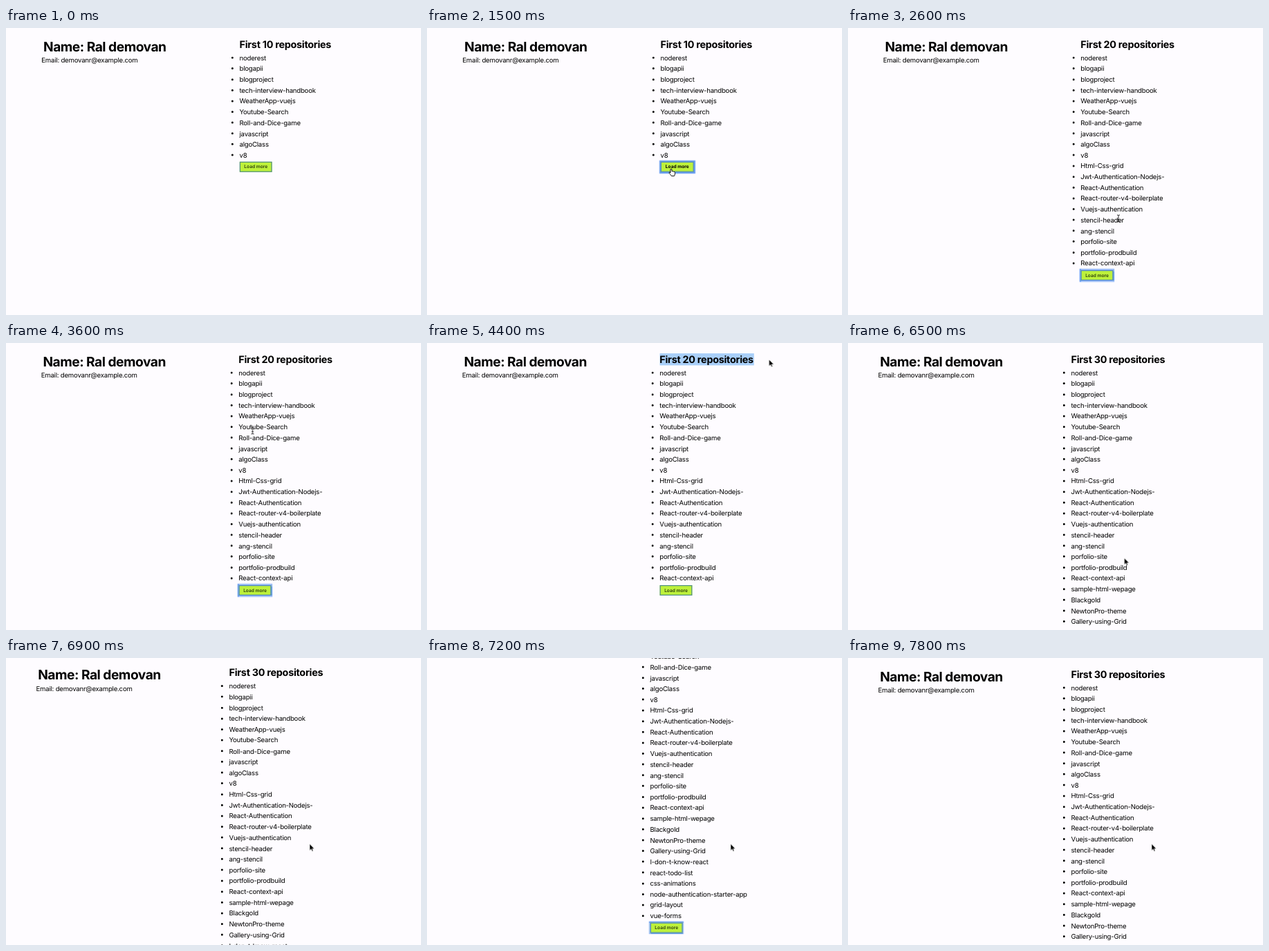
An HTML page for the animation above (8 s loop, 600 px wide and 416 px high).

```html
<!DOCTYPE html>
<html lang="en">
<head>
<meta charset="utf-8">
<title>Repositories</title>
<style>
html, body { margin: 0; width: 100%; height: 100%; overflow: hidden; background: #fefcff; }
body { position: relative; }
#page, #sheet, #user, #repos, h1, h2, #email, #lists, #mark, button, #cursor, #cursor svg { position: absolute; margin: 0; white-space: nowrap; }
#page, #sheet, #user, #repos { left: 0; top: 0; }

/* The web page is laid out 1000 px wide and shown at 60 % */
#sheet {
  width: 1000px; transform: scale(.6); transform-origin: 0 0;
  color: #000; font: 16px/26.13px Inter, "Open Sans", sans-serif;
  letter-spacing: -.023em; text-rendering: geometricPrecision;
}

/* Every track shares one 8 s clock and holds its value between steps */
#page, #user, #repos, h2, ul, #mark, button, button span, #cursor, #cursor svg {
  animation: 8s step-end infinite;
}
#page { animation-name: scroll; }
#user { animation-name: user; }
#repos { animation-name: repos; }

h1 { left: 90px; top: 25px; font-size: 32px; line-height: 40px; font-weight: 700; letter-spacing: -.026em; }
#email { left: 85.5px; top: 64.6px; }
h2 { left: 562.5px; top: 23px; font-size: 24px; line-height: 34px; font-weight: 700; letter-spacing: -.02em; }
#lists { left: 562.5px; top: 58.8px; }
ul { margin: 0; padding: 0; list-style: none; }
li { position: relative; height: 26.13px; }
li::before { content: ""; position: absolute; left: -20px; top: 10.5px; width: 5px; height: 5px; border-radius: 50%; background: #000; }
#mark { left: 563px; top: 25px; width: 0; height: 29px; background: #a9cff9; animation-name: mark; }

.first { animation-name: first; }
.second { animation-name: second; }
.third { animation-name: third; }
h2.second { animation-name: only-second; }

button {
  left: 563px; top: 323px; width: 78px; height: 25px; padding: 0; box-sizing: border-box;
  border: 2px solid #4f8d86; border-radius: 0; background: #bdf13b;
  font: 600 11px/21px Inter, "Open Sans", sans-serif; letter-spacing: 0; text-align: center;
  text-rendering: inherit;
  animation-name: drop, ring, grow;
}
button span { color: #283a0c; animation-name: hover; }

#cursor { left: 0; top: 0; animation-name: move; }
#cursor svg { left: 0; top: 0; width: 1px; height: 1px; overflow: visible; visibility: hidden; }
#cursor #hand { animation-name: hand; }
#cursor #beam { animation-name: beam; }
#cursor #arrow { animation-name: arrow; }

@keyframes first { 0% { visibility: visible } 22.5%, 100% { visibility: hidden } }
@keyframes only-second { 0% { visibility: hidden } 22.5% { visibility: visible } 80%, 100% { visibility: hidden } }
@keyframes second { 0% { visibility: hidden } 22.5%, 100% { visibility: visible } }
@keyframes third { 0% { visibility: hidden } 80%, 100% { visibility: visible } }

@keyframes user { 0% { left: 0 } 22.5% { left: -1px } 80%, 100% { left: -13px } }
@keyframes repos { 0% { left: 0 } 22.5% { left: -2px } 80%, 100% { left: -25px } }
@keyframes drop { 0% { top: 323px } 22.5% { top: 585px } 80%, 100% { top: 846px } }
@keyframes scroll {
  0%, 85% { transform: none }
  86.25% { transform: translateY(-2.4px) }
  87.5% { transform: translateY(-34px) }
  88.75% { transform: translateY(-88px) }
  90% { transform: translateY(-124px) }
  95% { transform: translateY(-72px) }
  96.25% { transform: translateY(-20px) }
  97.5%, 100% { transform: none }
}

@keyframes ring {
  0%, 47.5% { box-shadow: none; border-color: #4f8d86 }
  18.75%, 75%, 100% { box-shadow: 0 0 2px 3px #6098f0; border-color: #4f86c4 }
}
@keyframes grow {
  0%, 22.5%, 31.25%, 80%, 100% { width: 78px }
  5%, 27.5%, 71.25% { width: 80px }
}
@keyframes hover {
  0%, 22.5%, 31.25%, 80%, 100% { color: #283a0c; font-weight: 600 }
  5%, 27.5%, 71.25% { color: #000; font-weight: 700 }
}
@keyframes mark {
  0% { width: 0 }
  47.5% { width: 0; animation-timing-function: steps(4) }
  52.5% { width: 194px }
  53.75% { width: 227px }
  61.25%, 100% { width: 0 }
}

@keyframes hand {
  0%, 22.5%, 31.25%, 80%, 100% { visibility: hidden }
  5%, 27.5%, 71.25% { visibility: visible }
}
@keyframes beam {
  0%, 27.5%, 55%, 100% { visibility: hidden }
  22.5%, 31.25% { visibility: visible }
}
@keyframes arrow {
  0%, 71.25% { visibility: hidden }
  55%, 80%, 100% { visibility: visible }
}
@keyframes move {
  0% { transform: translate(379px, 207px) }
  5% { transform: translate(379px, 207px); animation-timing-function: steps(4) }
  10% { transform: translate(366px, 206px) }
  12.5% { transform: translate(364px, 205px) }
  13.75% { transform: translate(362px, 204px) }
  16.25% { transform: translate(353px, 204px) }
  22.5% { transform: translate(353px, 204px); animation-timing-function: steps(5) }
  28.75% { transform: translate(362px, 356px) }
  30% { transform: translate(366px, 352px) }
  31.25% { transform: translate(380px, 315px) }
  32.5% { transform: translate(391px, 276px); animation-timing-function: steps(6) }
  40% { transform: translate(386px, 284px) }
  42.5% { transform: translate(378px, 232px); animation-timing-function: steps(4) }
  47.5% { transform: translate(335px, 22px); animation-timing-function: steps(4) }
  52.5% { transform: translate(454px, 24px) }
  53.75% { transform: translate(478px, 24px) }
  55% { transform: translate(494.5px, 24px) }
  58.75% { transform: translate(494.5px, 26px); animation-timing-function: steps(4) }
  63.75% { transform: translate(433px, 206px); animation-timing-function: steps(6) }
  71.25% { transform: translate(364px, 352px) }
  73.75% { transform: translate(360px, 354px) }
  77.5% { transform: translate(360px, 354px); animation-timing-function: steps(6) }
  85%, 100% { transform: translate(439px, 269.5px) }
}
</style>
</head>
<body>
<div id="page">
  <div id="sheet">
    <div id="user">
      <h1>Name: Ral demovan</h1>
      <div id="email">Email: demovanr@example.com</div>
    </div>
    <div id="repos">
      <div id="mark"></div>
      <h2 class="first">First 10 repositories</h2>
      <h2 class="second">First 20 repositories</h2>
      <h2 class="third">First 30 repositories</h2>
      <div id="lists">
        <ul>
          <li>noderest</li>
          <li>blogapii</li>
          <li>blogproject</li>
          <li>tech-interview-handbook</li>
          <li>WeatherApp-vuejs</li>
          <li>Youtube-Search</li>
          <li>Roll-and-Dice-game</li>
          <li>javascript</li>
          <li>algoClass</li>
          <li>v8</li>
        </ul>
        <ul class="second">
          <li>Html-Css-grid</li>
          <li>Jwt-Authentication-Nodejs-</li>
          <li>React-Authentication</li>
          <li>React-router-v4-boilerplate</li>
          <li>Vuejs-authentication</li>
          <li>stencil-header</li>
          <li>ang-stencil</li>
          <li>porfolio-site</li>
          <li>portfolio-prodbuild</li>
          <li>React-context-api</li>
        </ul>
        <ul class="third">
          <li>sample-html-wepage</li>
          <li>Blackgold</li>
          <li>NewtonPro-theme</li>
          <li>Gallery-using-Grid</li>
          <li>I-don-t-know-react</li>
          <li>react-todo-list</li>
          <li>css-animations</li>
          <li>node-authentication-starter-app</li>
          <li>grid-layout</li>
          <li>vue-forms</li>
        </ul>
      </div>
      <button type="button" tabindex="-1"><span>Load more</span></button>
    </div>
  </div>
</div>
<div id="cursor">
  <svg id="hand"><path d="M-1 .8Q0-.6 1 .8V3.8Q2 3.1 2.5 4 3.6 3.4 4 4.5 5.4 4.1 5.6 5.4 5.8 8 4.6 10.5H.4Q-.6 8.6-2.8 6.3-3.2 5-2 5-1.4 5.2-1 6Z" fill="#fff" stroke="#000" stroke-width=".9"/></svg>
  <svg id="beam"><path d="M-2-5Q0-5 0-4Q0-5 2-5M0-4V4M-2 5Q0 5 0 4Q0 5 2 5M-1.2 1.5H1.2" fill="none" stroke="#111" stroke-width=".9"/></svg>
  <svg id="arrow"><path d="M0 0V9.5L2.2 7.4 3.7 10.8 5.2 10.1 3.8 6.9H6.8Z" fill="#000" stroke="#fff" stroke-width=".6"/></svg>
</div>
</body>
</html>
```
